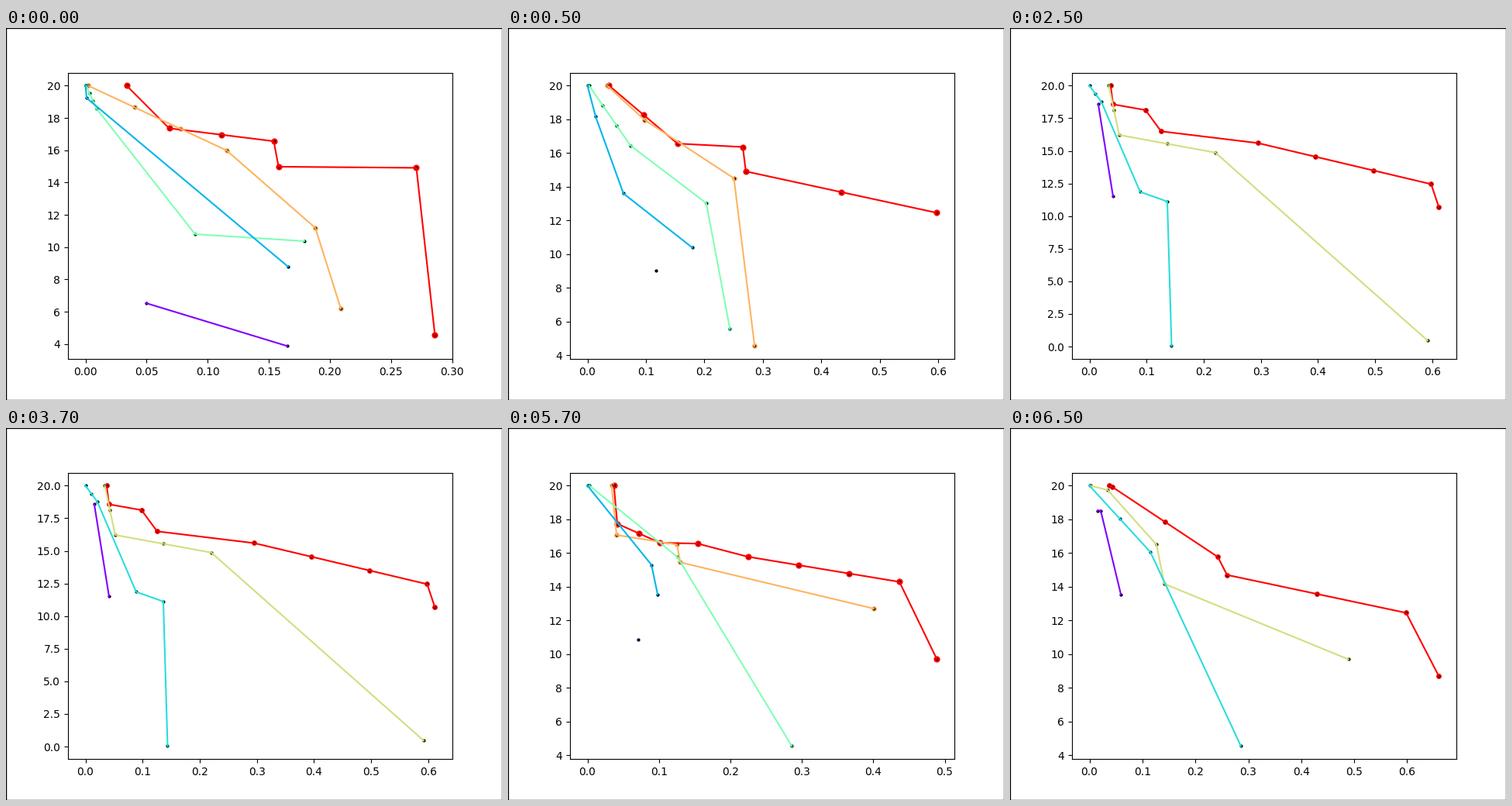
These frames come from a looping animation (640 px wide and 480 px high, 8 s). A matplotlib script:

```python
import numpy as np
import matplotlib.pyplot as plt
from matplotlib.animation import FuncAnimation
from matplotlib.patches import Rectangle

STEP_MS = 500
LOOP_MS = 8000
FIRST_STAY_MS, STAY_MS = 500, 2000


def front(start_x, *corners, top=20):
    """Walk from (start_x, top) through corners (x, y[, steps]) in even steps."""
    points = [(start_x, top)]
    for x, y, *steps in corners:
        points.extend(np.linspace(points[-1], (x, y), (steps or [1])[0] + 1)[1:])
    return np.array(points)


# Solutions that survive from one generation to the next.
tail, knee, far, ledge = (.286, 4.54), (.4891, 9.69), (.598, 12.45), (.1541, 16.56)

# Fronts of every generation, best first.
generations = [
    [front(.0337, (.0685, 17.36), (*ledge, 2), (.158, 14.98), (.2708, 14.91), tail),
     front(.0022, (.1155, 15.99, 3), (.1881, 11.19), (.209, 6.19)),
     front(.0005, (.009, 18.58, 3), (.0897, 10.8), (.179, 10.37)),
     front(0, (.001, 19.23), (.1658, 8.79)),
     front(.0496, (.1652, 3.87), top=6.53)],

    [front(.037, (*ledge, 2), (.2658, 16.36), (.271, 14.91), (*far, 2)),
     front(.0338, (.0975, 17.97), (.2506, 14.5), tail),
     front(.0028, (.0735, 16.45, 3), (.2033, 13.02), (.2438, 5.55)),
     front(0, (.0138, 18.18), (.0615, 13.6), (.1795, 10.38)),
     front(.1172, top=9)],

    [front(.037, (.0412, 18.57), (.098, 18.13), (.1254, 16.5), (.2948, 15.6),
           (*far, 3), (.6116, 10.67)),
     front(.0338, (.052, 16.22, 2), (.2203, 14.87, 2), (.5918, .46)),
     front(0, (.0209, 18.75, 2), (.0887, 11.86), (.1362, 11.12), (.1437, .04)),
     front(.0154, (.0413, 11.5), top=18.57)],

    [front(.037, (.0417, 17.74), (.1014, 16.61, 2), ledge, (.2245, 15.78),
           (.4366, 14.29, 3), knee),
     front(.0338, (.0407, 17.07), (.1254, 16.5), (.1297, 15.45), (.4008, 12.7)),
     front(.0028, (.1258, 15.77), tail),
     front(0, (.0895, 15.3), (.0982, 13.55)),
     front(.071, top=10.84)],

    [front(.037, (.0432, 19.92), (.2424, 15.77, 2), (.2598, 14.7), (*far, 2),
           (.66, 8.68)),
     front(.0015, (.0343, 19.74), (.1266, 16.5), (.1413, 14.17), knee),
     front(0, (.115, 16.06, 2), tail),
     front(.0154, (.0212, 18.52), (.0593, 13.55), top=18.52)],
]

plt.rcParams["font.family"] = "DejaVu Sans"
fig, ax = plt.subplots(figsize=(6.4, 4.8), dpi=100)
fig.add_artist(Rectangle((0, 0), 1, 1, transform=fig.transFigure,
                         fill=False, edgecolor="black", linewidth=1))


def draw(frame):
    ax.clear()
    elapsed = frame * STEP_MS - FIRST_STAY_MS
    fronts = generations[elapsed // STAY_MS + 1]
    colors = plt.cm.rainbow(np.linspace(1, 0, len(fronts)))
    for rank, (points, color) in enumerate(zip(fronts, colors)):
        depth = len(fronts) - 1 - rank
        ax.scatter(*points.T, s=4 + 1.25 * depth ** 2, color=[color])
        ax.plot(*points.T, color=color)
    ax.scatter(*np.concatenate(fronts).T, s=3, color="black")


anim = FuncAnimation(fig, draw, frames=LOOP_MS // STEP_MS, interval=STEP_MS,
                     init_func=lambda: None, repeat=True, repeat_delay=0)
plt.show()
```
